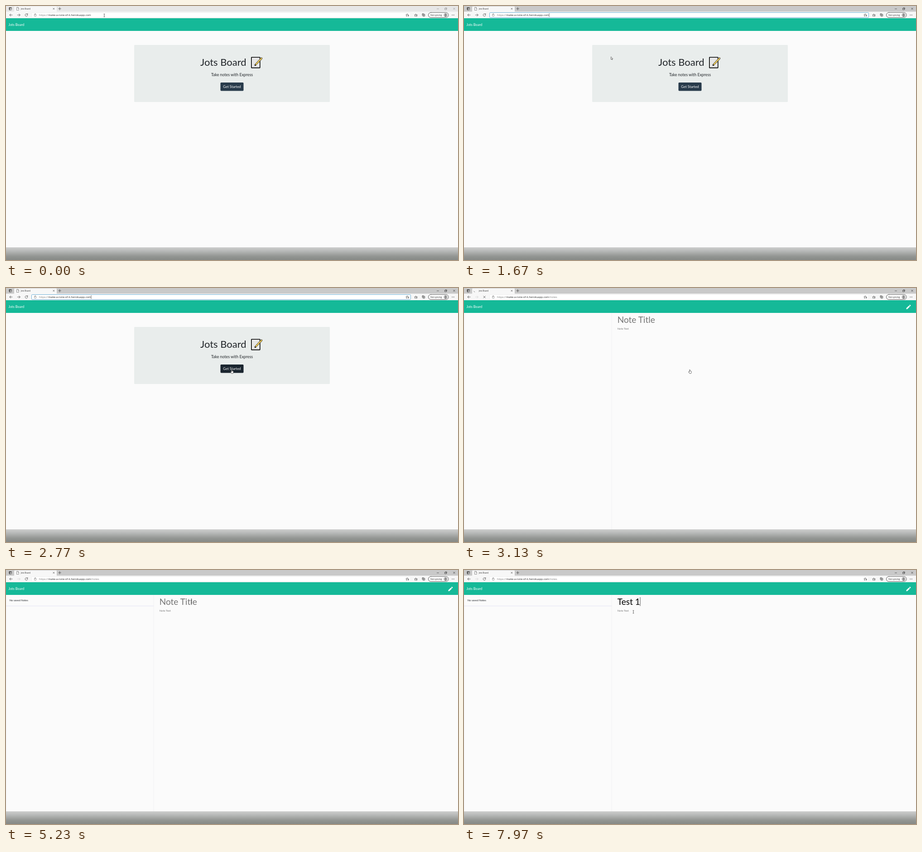
Write an HTML page that moves like this. It is 998 by 561 pixels and loops after 8 s.

```html
<!DOCTYPE html>
<html lang="en">
<head>
<meta charset="utf-8">
<title>Jots Board</title>
<style>
  html, body { margin: 0; width: 100%; height: 100%; overflow: hidden; background: #fbfbfb; }
  svg { display: block; width: 100vw; height: 100vh; }
  text { font-family: Lato, sans-serif; white-space: pre; }
  .ui { font-family: "Open Sans", "Noto Sans", sans-serif; }
  .ico { fill: none; stroke: #3c3c3c; stroke-width: .75; stroke-linecap: round; stroke-linejoin: round; }
</style>
</head>
<body>
<svg viewBox="0 0 998 561" preserveAspectRatio="none">
  <defs>
    <linearGradient id="shade" x2="0" y2="1">
      <stop offset="0" stop-color="#cdcecd"/>
      <stop offset=".3" stop-color="#b6b8b7"/>
      <stop offset=".7" stop-color="#939693"/>
      <stop offset="1" stop-color="#868986"/>
    </linearGradient>
  </defs>

  <rect width="998" height="561" fill="#fbfbfb"/>

  <!-- browser frame -->
  <rect id="strip" width="998" height="13"/>
  <path d="M18 13V2.500q0-1.500 1.500-1.500h91q1.500 0 1.500 1.500V13z" fill="#f7f7f7"/>
  <rect y="12.500" width="998" height="15" fill="#f7f7f7"/>
  <g class="ico">
    <rect x="6.800" y="3.400" width="5.400" height="5.400" rx=".8"/>
    <path d="M7 4.200h5M8.300 4v4.500" stroke-width="1.300"/>
    <path id="sheet" d="M23.800 3h2.700l1.600 1.700v4.800h-4.300zM26.400 3v1.800h1.700" stroke="#555" stroke-width=".6"/>
    <path id="spin" d="M23.600 4.800a2 2 0 0 1 2 2" stroke="#777" stroke-width=".7"/>
    <path d="M104 4.700l2.800 2.800m0-2.800l-2.800 2.800M115.800 6h5.600M118.600 3.200v5.600"/>
    <path id="win" d="M951.500 6.300h4M969 5h3.200v3.200h-3.200zM970 5v-1h3.200v3.200h-1M987.700 4.200l3.600 3.600m0-3.600l-3.600 3.600" stroke-width=".65"/>
    <path d="M14 19.900H8m2.600-2.600L8 19.900l2.600 2.600"/>
    <path id="fwd" d="M25.200 19.900h6m-2.600-2.600l2.600 2.600-2.600 2.600"/>
    <path id="reload" d="M47.800 19.600a2.800 2.800 0 1 1-1-1.900M47.800 16.600v1.800h-1.900"/>
    <path id="stop" d="M43 17.800l4.200 4.200m0-4.200l-4.200 4.200"/>
  </g>
  <rect id="bar" x="56.500" y="14.500" width="837" height="11" rx="1.800" fill="#fff"/>
  <g class="ico">
    <rect x="62.600" y="18.700" width="4" height="3.800" rx=".6" stroke="#666" stroke-width=".6"/>
    <path d="M63.500 18.600v-.8a1.100 1.100 0 0 1 2.200 0v.8" stroke="#666" stroke-width=".6"/>
    <path d="M885.500 22l-1.700.6.500-2-1.300-1.400 1.900-.2.900-1.900.9 1.900 2 .2"/>
    <path d="M887 21.500h2.600M888.300 20.200v2.600"/>
    <path d="M903.800 22.500l-.9.600.3-2-1.400-1.400 2-.3.900-1.900.9 1.900M905.500 19.400h2.700M905.500 21h2.500M905.500 22.500h2"/>
    <rect x="919" y="17" width="4.300" height="4.300" rx=".8"/>
    <path d="M924.800 18.500v3.400q0 .8-.8.800h-3.300M921.200 18v2.300M920 19.200h2.300"/>
    <rect x="932.500" y="14.300" width="44.500" height="11.200" rx="5.600" fill="#fafafa" stroke-width=".8"/>
  </g>
  <circle cx="970.600" cy="19.900" r="4.200" fill="#b9b9b9"/>
  <g fill="#777"><circle cx="970.600" cy="18.600" r="1.500"/><path d="M968 22.600q2.600-3.600 5.200 0q-2.600 1.800-5.200 0z"/></g>
  <g fill="#444"><circle cx="984.800" cy="19.900" r=".7"/><circle cx="987.100" cy="19.900" r=".7"/><circle cx="989.400" cy="19.900" r=".7"/></g>
  <text class="ui" x="32.500" y="7.800" font-size="4.500" fill="#333">Jots Board</text>
  <text class="ui" x="937.200" y="21.600" font-size="4.600" fill="#333">Not syncing</text>
  <rect id="pick" x="73" y="15.500" width="115" height="9" fill="#0078d7"/>
  <text class="ui" id="url" x="73" y="22.200" font-size="6"><tspan id="scheme">https://</tspan><tspan id="host">make-a-note-of-it.herokuapp.com</tspan><tspan id="path" fill="#777">/notes</tspan></text>
  <rect id="urlCaret" y="16" width=".6" height="8" fill="#222"/>

  <!-- page header -->
  <rect y="27" width="998" height="28" fill="#15b998"/>
  <text x="5.600" y="44" font-size="7.500" fill="#fff">Jots Board</text>

  <g id="home">
    <rect x="283" y="86" width="432" height="126" rx="1.500" fill="#e9edec"/>
    <text x="429" y="132" font-size="22" fill="#212529">Jots Board</text>
    <g fill="none" stroke-linecap="round">
      <rect x="541.900" y="113.300" width="18.800" height="23.200" rx=".5" fill="#fafafa" stroke="#111" stroke-width="1.800"/>
      <path d="M544.500 117.500h13.500M544.500 120.500h13.500M544.500 123.500h11M544.500 126.500h8M544.500 129.500h5M544.500 133h13.500" stroke="#b8b8b8" stroke-width=".9"/>
      <path d="M550.800 130L564.200 115.600" stroke="#222" stroke-width="4"/>
      <path d="M551.800 128.900L564.200 115.600" stroke="#f3cf5b" stroke-width="2.500"/>
      <path d="M549.300 131.500l1.500-1.500" stroke="#222" stroke-width="1.300"/>
    </g>
    <text x="499" y="154.900" font-size="8.800" fill="#212529" text-anchor="middle">Take notes with Express</text>
    <rect id="btn" x="473.500" y="169" width="51" height="18.500" rx="1.800"/>
    <text x="499" y="181.100" font-size="7.800" fill="#fff" text-anchor="middle">Get Started</text>
  </g>

  <g id="notes">
    <path d="M985.200 37.200l1 1q.5.600 0 1.200l-1 1-2.200-2.200 1-1q.600-.5 1.200 0zM982.300 38.900l2.200 2.200-5.500 5.300-2.600.4.400-2.600z" fill="#fff"/>
    <path d="M.3 55v478M326.300 55v478" stroke="#efeff2" stroke-width=".7"/>
    <g id="list">
      <text x="7.700" y="69.400" font-size="5.900" fill="#212529">No saved Notes</text>
      <path d="M0 79.400h326" stroke="#dfdff3" stroke-width=".8"/>
    </g>
    <text id="title" x="338.800" y="76.700" font-size="19"></text>
    <rect id="caret" y="60" width=".7" height="19.500" fill="#111"/>
    <text x="338.700" y="91.900" font-size="5.900" fill="#777">Note Text</text>
  </g>

  <rect y="533" width="998" height="28" fill="url(#shade)"/>

  <!-- pointers, each with its hot spot at 0,0 -->
  <path id="beam" d="M-1.300-3.200h1l.3.300.3-.3h1M0-3V3M-1.300 3.200h1l.3-.3.3.3h1" fill="none" stroke="#222" stroke-width=".7"/>
  <path id="arrow" d="M0 0v6l1.400-1.200.9 2.100 1-.4-.9-2h1.900z" fill="#fff" stroke="#222" stroke-width=".6" stroke-linejoin="round"/>
  <path id="hand" d="M-.7.300q.7-.8 1.400 0v2.500l2.200.5q1 .3.900 1.300l-.6 2.700-.5 1H-.6l-2-3.200q-.3-1 .6-1l1.300 1z" fill="#fff" stroke="#222" stroke-width=".65" stroke-linejoin="round"/>
</svg>
<script>
  const LOOP = 8000, FOCUS = 200, DESELECT = 1200, HOVER = 2380,
        NAVIGATE = 2950, LOADED = 3480, EDIT = 4640, BLINK = 530;
  const typed = "Test 1";
  const keys = [7480, 7570, 7650, 7740, 7830, 7920];

  // time, x, y
  const route = [
    [0, 217, 20.800], [150, 217, 20.800], [400, 218.800, 20.800], [1200, 218.800, 20.800],
    [1650, 324.500, 112], [1750, 324.500, 112], [2480, 498.500, 180.500],
    [3300, 498.500, 180.500], [4100, 409.200, 70], [5300, 409.200, 70],
    [5800, 374, 92.500], [8000, 374, 92.500]
  ];

  const el = {};
  document.querySelectorAll("[id]").forEach(n => el[n.id] = n);
  const set = (n, name, value) => n.setAttribute(name, value);
  const show = (n, on) => set(n, "display", on ? "inline" : "none");
  const blink = (t, start) => t >= start && (t - start) % (2 * BLINK) < BLINK;

  function pointerAt(t) {
    const i = route.findIndex(p => p[0] > t);
    const [t0, x0, y0] = route[i - 1], [t1, x1, y1] = route[i];
    const u = (t - t0) / (t1 - t0), e = u * u * (3 - 2 * u);
    return [x0 + (x1 - x0) * e, y0 + (y1 - y0) * e];
  }

  function drawFrame(t) {
    const active = t >= FOCUS, selected = active && t < DESELECT;
    const onNotes = t >= NAVIGATE, loading = onNotes && t < LOADED;

    set(el.strip, "fill", active ? "#c9c9c9" : "#e7e7e7");
    el.win.style.stroke = active ? "#222" : "#888";
    const focused = active && !onNotes;
    set(el.bar, "stroke", focused ? "#6fb0d6" : "#e3e3e3");
    set(el.bar, "stroke-width", focused ? 1 : .5);
    show(el.sheet, !loading);
    show(el.spin, loading);
    set(el.spin, "transform", `rotate(${t * .4 % 360} 23.600 6.800)`);
    show(el.reload, !loading);
    show(el.stop, loading);
    set(el.fwd, "opacity", onNotes ? .2 : 1);

    show(el.pick, selected);
    set(el.scheme, "fill", selected ? "#fff" : "#777");
    set(el.host, "fill", selected ? "#fff" : "#222");
    show(el.path, onNotes);
    show(el.urlCaret, !onNotes && blink(t, DESELECT));
    if (!onNotes) set(el.urlCaret, "x", 73 + el.url.getComputedTextLength());

    show(el.home, !onNotes);
    show(el.notes, onNotes);
    set(el.btn, "fill", t >= HOVER ? "#1a252f" : "#283b4b");
    show(el.list, t >= LOADED);

    const count = keys.filter(k => t >= k).length;
    el.title.textContent = count ? typed.slice(0, count) : "Note Title";
    set(el.title, "fill", count ? "#000" : "#757575");
    show(el.caret, count > 0 || blink(t, EDIT));
    const width = count ? el.title.getComputedTextLength() : 0;
    set(el.caret, "x", 338.8 + width);

    const [x, y] = pointerAt(t);
    const overButton = t >= HOVER && t < 3340;
    const overText = y < 26 || (onNotes && x < 440 && y < 100);
    const kind = overButton ? "hand" : overText ? "beam" : "arrow";
    for (const name of ["beam", "arrow", "hand"]) {
      show(el[name], name === kind);
      set(el[name], "transform", `translate(${x} ${y})`);
    }
  }

  const start = performance.now();
  function tick() {
    drawFrame((performance.now() - start) % LOOP);
    requestAnimationFrame(tick);
  }
  tick();
</script>
</body>
</html>
```
